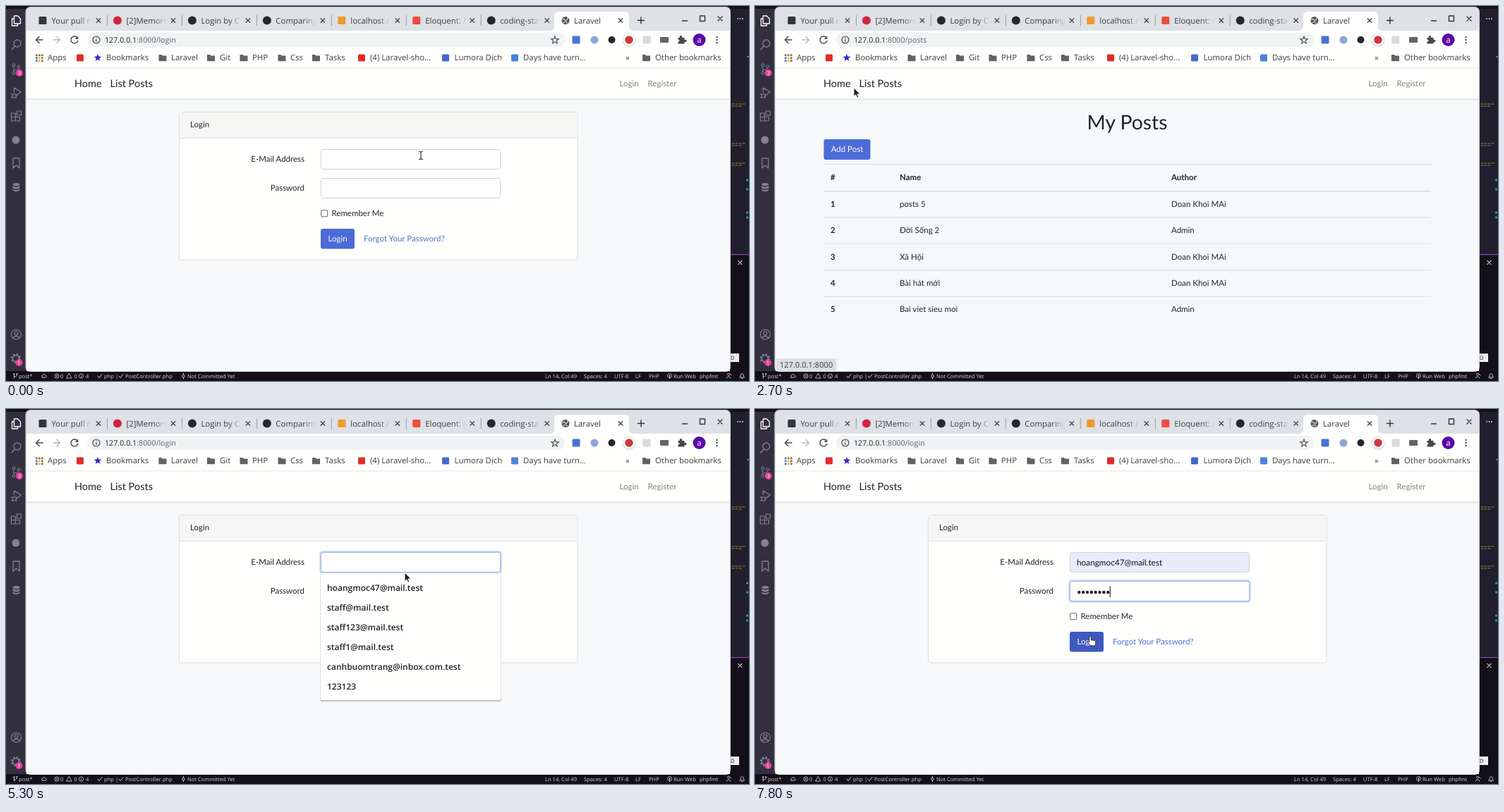
Animation, 1053 px wide and 532 px high, one loop 8000 ms. Source, as an HTML page:

```html
<!DOCTYPE html>
<html lang="en">
<head>
<meta charset="utf-8">
<title>Login demo</title>
<style>
html, body { margin: 0; width: 100%; height: 100%; overflow: hidden; background: #131019; }
svg { display: block; width: 100vw; height: 100vh; }
text { text-rendering: geometricPrecision; white-space: pre; fill: #212529; }
.ui { font: 11.4px "Open Sans", "Noto Sans", sans-serif; fill: #3b3d40; }
.url { font: 10.7px "Open Sans", "Noto Sans", sans-serif; fill: #202124; }
.bar { font: 7.6px "Open Sans", "Noto Sans", sans-serif; fill: #d8d6de; }
.hint { font: 600 12px "Open Sans", "Noto Sans", sans-serif; }
.page { font: 11.5px Lato, "Open Sans", sans-serif; }
.b { font-weight: 700; }
.nav { font: 14.5px Lato, "Open Sans", sans-serif; }
.mail { font: 11.8px Lato, "Open Sans", sans-serif; fill: #111; }
.h1 { font: 28.3px Lato, "Open Sans", sans-serif; }
.muted { fill: #838383; }
.link { fill: #4f74cf; }
.white { fill: #fff; }
.line { fill: none; stroke-linecap: round; stroke-linejoin: round; }
</style>
</head>
<body>
<svg id="stage" viewBox="0 0 1053 532" preserveAspectRatio="none"></svg>
<script>
const LOOP = 8000, STEP = 100;
const WHITE = '#fefefc', MAIL = 'hoangmoc47@mail.test';
const BLUE = '#4b6bd6', BLUE_HOVER = '#3f59bf';

const text = (x, y, s, cls, more = '') => `<text x="${x}" y="${y}" class="${cls}" ${more}>${s}</text>`;
const rect = (x, y, w, h, fill, more = '') => `<rect x="${x}" y="${y}" width="${w}" height="${h}" fill="${fill}" ${more}/>`;
const disc = (x, y, r, fill, more = '') => `<circle cx="${x}" cy="${y}" r="${r}" fill="${fill}" ${more}/>`;
const line = (d, color, w = 1.3, more = '') => `<path class="line" d="${d}" stroke="${color}" stroke-width="${w}" ${more}/>`;
const shape = (d, fill, more = '') => `<path d="${d}" fill="${fill}" ${more}/>`;
const group = (id, body, more = '') => `<g id="${id}" ${more}>${body}</g>`;
const at = (x, y, body) => `<g transform="translate(${x} ${y})">${body}</g>`;
const square = (x, y, fill, s = 10) => rect(x - s / 2, y - s / 2, s, s, fill, 'rx="1.5"');
const cross = (x, y, r, color, w = 1.3) => line(`M${x - r} ${y - r}l${2 * r} ${2 * r}m0 ${-2 * r}l${-2 * r} ${2 * r}`, color, w);
const folder = x => shape(`M${x - 5.5} 69h4l1.5 1.6h5.5v7.6h-11z`, '#5f6368');

function star(x, y, r) {
  let d = '';
  for (let i = 0; i < 10; i++) {
    const a = -Math.PI / 2 + i * Math.PI / 5, k = i % 2 ? r * .42 : r;
    d += (i ? 'L' : 'M') + (x + k * Math.cos(a)).toFixed(2) + ' ' + (y + k * Math.sin(a)).toFixed(2);
  }
  return d + 'Z';
}

function editor() {
  const g = '#85828f';
  const badge = (x, y, s) => disc(x, y, 5, '#e3419b') + text(x, y + 2.7, s, 'bar white', 'text-anchor="middle"');
  let s = rect(0, 0, 1053, 532, '#131019') + rect(0, 4, 29, 514, '#322f3e') +
    rect(1026, 4, 27, 348, '#211e2d') + rect(1026, 352, 27, 1.2, '#8b45b8');
  s += at(14.5, 21, line('M-3-7h5l4 4v7h-9zM-3-3h-3v10h8v-3', '#fff'));
  s += at(14.5, 55, disc(1.5, -2, 5, 'none', `stroke="${g}" stroke-width="1.3"`) + line('M-2 2l-4.5 5', g));
  s += at(14, 89, [[-3, -5], [4, -3], [-3, 6]].map(p => disc(...p, 2, 'none', `stroke="${g}"`)).join('') + line('M-3-3v7M4-1q0 3-7 3', g, 1)) + badge(19, 95, 3);
  s += at(14.5, 123, line('M-3-1v-6l10 6-8 6M-5 2h5v5h-5zM-7 2l2 1m-2 4l2-1', g, 1.2));
  s += at(14.5, 156, line('M-7-4h6v11h-6zM-7 1.500h12v5.500h-6M1-7h6v6h-6z', g, 1.2));
  s += disc(14, 190, 5.5, g);
  s += at(14.5, 223, line('M-4.500-7h9v14l-4.500-4-4.500 4z', g));
  s += at(14.5, 257, `<ellipse cy="-4" rx="5" ry="2" fill="${g}"/>` + shape('M-5-2q5 3 10 0v3q-5 3-10 0zM-5 2.500q5 3 10 0v2q-5 3-10 0z', g));
  s += at(14.5, 466, disc(0, 0, 7, 'none', `stroke="${g}" stroke-width="1.2"`) + disc(0, -2, 2.5, 'none', `stroke="${g}" stroke-width="1.2"`) + line('M-4.500 5q4.500-6 9 0', g));
  s += disc(14, 500, 5.5, 'none', `stroke="${g}" stroke-width="3" stroke-dasharray="2.300 2.020"`) +
    disc(14, 500, 4.4, 'none', `stroke="${g}" stroke-width="1.400"`) + badge(18.5, 506, 1);

  [1037, 1040.5, 1044].forEach(x => s += disc(x, 18, .9, '#ddd'));
  [139, 142, 195, 198, 223, 226].forEach((y, i) => s += line(`M1029 ${y}h${i % 2 ? 13 : 18}`, '#8b8c45', 1, 'stroke-dasharray="3 2"'));
  [247, 260, 293, 300].forEach(y => s += rect(1049, y - 1.5, 3, 3, '#1fa77a'));
  s += rect(1050, 71, 3, 2, '#3d77b8') + cross(1040.5, 364, 2.6, '#ddd', 1.1);
  s += rect(1026, 493, 13, 12, '#eee') + text(1027, 502, 'D', 'bar', 'style="fill:#222"');

  const w = '#d8d6de';
  s += line('M11.500 523v5m0-2q4 0 4-2.500', w, .9) + disc(11.5, 522, 1.1, w) + disc(15.5, 522, 1.1, w);
  s += line('M51.500 527h5q2-1 0-3-2-3-4-.5-3 .5-1 3.500z', w, .9);
  s += disc(72, 525, 3.1, 'none', `stroke="${w}" stroke-width=".8"`) + cross(72, 525, 1.3, w, .7);
  s += line('M89.500 521.500l3.500 6.500h-7z', w, .8) + disc(106.5, 525, 3.1, 'none', `stroke="${w}" stroke-width=".8"`) + line('M106.500 524.500v2', w, .8);
  [130, 160].forEach(x => s += line(`M${x} 525l2 2.500 4-5`, w, 1));
  s += disc(251.5, 525, 1.8, 'none', `stroke="${w}" stroke-width=".9"`) + line('M251.500 521v2m0 4v2', w, .9);
  [[18, 'post*'], [77, '0'], [96.5, '0'], [113, '4'], [139, 'php |'], [169, 'PostController.php'], [257, 'Not Committed Yet'],
    [764, 'Ln 14, Col 49'], [819, 'Spaces: 4'], [862, 'UTF-8'], [892, 'LF'], [911, 'PHP'], [946, 'Run Web'], [983, 'phpfmt']]
    .forEach(([x, t]) => s += text(x, 527.5, t, 'bar'));
  s += disc(940.5, 524.5, 3, 'none', `stroke="${w}" stroke-width=".8"`) + disc(940.5, 524.5, 1.1, w) + line('M940.500 525v3.500', w, .8);
  s += line('M1021 528q3-5 6 0M1026 522l2 2', w, .9) + disc(1024, 522.5, 1.5, 'none', `stroke="${w}" stroke-width=".8"`);
  return s + line('M1040 527h6.500l-1-1.500v-2q-2.200-4-4.500 0v2zm2.500 1.500h1.500', w, .9);
}

function tabs() {
  const names = ['Your pull r', '[2]Memoro', 'Login by C', 'Comparing', 'localhost /', 'Eloquent: A', 'coding-sta'];
  const marks = ['#33363b', '#d0243f', '#24292e', '#24292e', '#ee9a2f', '#ef4b3f', '#24292e'];
  const round = [0, 1, 1, 1, 0, 0, 1];
  let s = rect(29, 2, 997, 60, '#dee1e5', 'rx="6"');
  s += shape('M770 35q7 0 7-6V14q0-6 6-6h94q6 0 6 6v15q0 6 7 6z', WHITE);
  names.forEach((n, i) => {
    const x = 52 + i * 105.95;
    s += round[i] ? disc(x, 20.5, 6, marks[i]) : square(x, 20.5, marks[i], 11);
    s += `<svg x="${x + 12}" y="8" width="57" height="26">${text(.5, 16.6, n, 'ui')}</svg>`;
    s += rect(x + 52, 10, 17, 22, 'url(#fade)') + cross(x + 79, 20.5, 2.8, '#45484c');
    if (i < 6) s += rect(x + 91, 13, 1, 15, '#9a9da2');
  });
  s += group('globe', disc(793, 20.5, 5.5, '#55585c') + line('M788.500 19q3-1 4 1t3-1 0-3M790 24q2-3 5 0', '#dfe2e5', 1.2));
  s += group('spin', line('M0-5.500q1.500 0 2.600.7', '#a5ad62', 1.3));
  s += `<svg x="805" y="8" width="54" height="26"><text id="title" x="0" y="16.6" class="ui"></text></svg>`;
  s += rect(847, 12, 13, 18, 'url(#fadeWhite)') + cross(871, 20.5, 2.8, '#45484c');
  s += line('M895.500 20.500h9m-4.500-4.500v9M958.500 21h7M983.500 14h7v7.500h-7z', '#333', 1.4) + cross(1012, 18, 3, '#333', 1.4);
  return s;
}

function toolbar() {
  const k = '#45484c';
  let s = rect(29, 35, 997, 53, WHITE) + rect(115, 38, 677, 20, '#f0f2f3', 'rx="10"');
  s += line('M52 48H42.500m4.500-4.500l-4.500 4.500 4.500 4.500', k, 1.5) + line('M67 48h9.500m-4.500-4.500l4.500 4.500-4.500 4.500', '#b9bbbe', 1.5);
  s += group('reload', line('M101 45a5 5 0 1 0 .800 4.500', k, 1.5) + shape('M102.300 42.500v4.500h-4.500z', k));
  s += group('stop', cross(97, 48, 4, k, 1.5));
  s += disc(128, 48, 5, 'none', `stroke="${k}" stroke-width="1.2"`) + line('M128 47.500v3', k, 1.2) + disc(128, 45.3, .8, k);
  s += `<text x="140" y="52" class="url">127.0.0.1<tspan id="path" fill="#63676b"></tspan></text>`;
  s += shape(star(778, 48.5, 5.5), 'none', `stroke="${k}" stroke-width="1.1"`);
  s += square(808, 48, '#4774d6', 11) + disc(834, 48, 5.5, '#8da6d4') + disc(858.5, 48, 5, '#25272a');
  s += group('ring', disc(883, 48.4, 9.4, '#d0d2d4') + disc(883, 48, 8.6, '#fff'));
  s += disc(883, 48, 5.8, '#cf3a40') + square(908, 48, '#d9dadb', 11) + rect(927, 44, 12, 8, '#606367', 'rx="1"');
  s += shape('M952.500 45h2.500q-1-3 1.500-3t1.500 3h3.500v3q3-1 3 1.500t-3 1.500v2.500h-9v-3q2 0 2-1.500t-2-1.500z', k);
  s += disc(982.5, 48, 9, '#5a0aa5') + text(982.5, 51.7, 'a', 'ui white', 'text-anchor="middle"');
  [44, 48, 52].forEach(y => s += disc(1007.5, y, 1.2, k));

  const hues = ['#e0473b', '#3c9a55', '#e0473b', '#3b78d8', '#f0b32c', '#3c9a55', '#3b78d8', '#f0b32c', '#e0473b'];
  hues.forEach((c, i) => s += rect(42 + i % 3 * 4, 68.5 + (i / 3 | 0) * 4, 2.7, 2.7, c));
  s += square(105, 73.5, '#e12b2b') + shape(star(130, 73.5, 5.6), '#3a22d0') + square(504, 73.5, '#e12b2b');
  s += square(623, 73.5, '#4468cf') + square(721, 73.5, '#4a83d8');
  [222, 290.5, 337, 391, 439.5, 907.5].forEach(x => s += folder(x));
  [[59, 'Apps'], [142, 'Bookmarks'], [234, 'Laravel'], [303, 'Git'], [349, 'PHP'], [403, 'Css'], [452, 'Tasks'],
    [516, '(4) Laravel-sho...'], [635.5, 'Lumora Dịch'], [733, 'Days have turn...'], [878, '»'], [920, 'Other bookmarks']]
    .forEach(([x, t]) => s += text(x, 77.4, t, 'ui'));
  return s + rect(29, 87.5, 997, 1, '#dfe1e3');
}

function navbar() {
  return rect(29, 131, 997, 4, 'url(#shade)') + rect(29, 88.5, 997, 42.5, WHITE) +
    text(97, 115, 'Home', 'nav') + text(147.5, 115, 'List Posts', 'nav') +
    text(869.5, 113.6, 'Login', 'page muted', 'id="navLogin"') + text(909.5, 113.6, 'Register', 'page muted');
}

function field(id, y) {
  return rect(444.3, y - 1.7, 258.4, 32.4, '#c4d6f3', `rx="4.5" id="${id}Ring"`) +
    rect(446.5, y + .5, 254, 28, WHITE, `rx="3" stroke="#ced2d6" id="${id}Box"`);
}

function loginPage() {
  const hints = [MAIL, 'staff@mail.test', 'staff123@mail.test', 'staff1@mail.test', 'canhbuomtrang@inbox.com.test', '123123'];
  let s = rect(245.5, 150.5, 564.5, 209.5, WHITE, 'rx="3" stroke="#dcdedf"');
  s += rect(246, 151, 563.5, 36, '#f6f6f4') + rect(246, 187, 563.5, 1, '#dcdedf');
  s += text(261, 172.4, 'Login', 'page') + text(423, 221.2, 'E-Mail Address', 'page', 'text-anchor="end"') +
    text(423, 262.2, 'Password', 'page', 'text-anchor="end"');
  s += field('mail', 203) + field('pass', 244);
  s += text(456, 222, MAIL, 'mail', 'id="mailText"') + line('', '#e04a4a', .8, 'id="squiggle"');
  s += group('dots', '') + rect(0, 0, 1, 16, '#111', 'id="caret"');
  s += rect(446.7, 289.7, 9, 9, WHITE, 'rx="1.5" stroke="#6d6d6d" stroke-width="1.1"') + text(461.5, 298, 'Remember Me', 'page');
  s += rect(446, 316, 48, 28.5, BLUE, 'rx="3" id="submit"') + text(470, 333.8, 'Login', 'page white', 'text-anchor="middle"');
  s += text(507, 333.8, 'Forgot Your Password?', 'page link');
  s += group('hints', rect(445, 234, 257, 181, '#bfc1c3', 'rx="3"') + rect(445.5, 233, 256, 180, WHITE, 'rx="2"') +
    rect(445.5, 240, 256, 28, '#e8e9ea', 'id="hintRow"') +
    hints.map((h, i) => text(455, 258.2 + i * 27.9, h, 'hint')).join(''));
  return s;
}

function postsPage() {
  const rows = [['#', 'Name', 'Author'], [1, 'posts 5', 0], [2, 'Đời Sống 2', 1], [3, 'Xã Hội', 0], [4, 'Bài hát mới', 0], [5, 'Bai viet sieu moi', 1]];
  const who = ['Doan Khoi MAi', 'Admin'];
  let s = text(527.5, 175, 'My Posts', 'h1', 'text-anchor="middle"');
  s += rect(97.5, 189, 66, 29, BLUE, 'rx="3"') + text(130.5, 207.3, 'Add Post', 'page white', 'text-anchor="middle"');
  rows.forEach(([n, name, by], i) => {
    const y = i ? 247.7 + i * 37.3 : 247;
    s += text(107, y, n, 'page b') + text(205, y, name, i ? 'page' : 'page b') + text(590, y, i ? who[by] : by, i ? 'page' : 'page b');
    s += rect(97, i ? 224.600 + i * 37.4 : 224, 861, i === 1 ? 1.5 : 1, '#dadde0');
  });
  return s;
}

const arrow = shape('M0 0V12.500L2.900 9.800 4.900 14.200 6.900 13.300 5 9H8.800Z', '#222', 'stroke="#fff" stroke-width=".9"');
const beam = line('M-2.500-5.500q2.500 0 2.500 1.500v8q0 1.500-2.500 1.500M2.500-5.500q-2.500 0-2.500 1.500v8q0 1.500 2.500 1.500', '#222', 1.1);
const hand = shape('M-1.300 1q1.300-2 2.600 0V5.500l5 1q2 .5 1.700 2.500l-1 5h-6.500l-4-5q-.5-1.800 1-1.200l1.200 1.200z', '#fff', 'stroke="#222" stroke-width="1" stroke-linejoin="round"');

document.getElementById('stage').innerHTML = `<defs>
  <linearGradient id="fade"><stop stop-color="#dee1e5" stop-opacity="0"/><stop offset="1" stop-color="#dee1e5"/></linearGradient>
  <linearGradient id="fadeWhite"><stop stop-color="${WHITE}" stop-opacity="0"/><stop offset="1" stop-color="${WHITE}"/></linearGradient>
  <linearGradient id="shade" x2="0" y2="1"><stop stop-color="#e2e5e8"/><stop offset="1" stop-color="#f6f8fa"/></linearGradient></defs>` +
  editor() + rect(27.5, 1, 999.5, 518, '#c9cbcf', 'rx="7"') + tabs() + rect(29, 60, 997, 458, '#f6f8fa') + toolbar() + navbar() +
  group('login', loginPage()) + group('posts', postsPage()) +
  group('bubble', shape('', '#dcdfe2', 'id="bubbleBox"') + text(35, 512.7, '', 'ui', 'id="bubbleText" style="font-size:11.100px"')) +
  group('cursor', group('arrow', arrow) + group('beam', beam) + group('hand', hand));

const el = {};
document.querySelectorAll('[id]').forEach(e => el[e.id] = e);
const show = (id, on) => el[id].style.display = on ? '' : 'none';
const set = (id, o) => Object.entries(o).forEach(([k, v]) => el[id].setAttribute(k, v));
const put = (id, s) => { if (el[id].textContent !== s) el[id].textContent = s; };

// time, x, y of the pointer; its kind lasts until another is named
const moves = [
  [0, 588, 212, 'beam'], [100, 588, 212], [200, 450, 204, 'arrow'], [300, 316, 192], [400, 316, 192],
  [600, 205, 128], [700, 184, 112, 'hand'], [1100, 184, 112], [1200, 230, 135, 'arrow'], [1400, 439, 205],
  [1700, 676, 270], [1900, 520, 235], [2200, 168, 163], [2300, 168, 112, 'hand'], [2500, 128, 111],
  [2700, 140, 116, 'arrow'], [2900, 142, 118], [3200, 142, 118], [4100, 858, 120], [4200, 872, 116, 'hand'],
  [4400, 872, 116], [4500, 840, 160, 'arrow'], [4600, 808, 200], [4700, 808, 200], [4900, 640, 213, 'beam'],
  [5000, 465, 214], [5100, 560, 216], [5200, 560, 216], [5300, 565, 232, 'arrow'], [5500, 548, 249],
  [5700, 540, 258, 'beam'], [5800, 533, 262], [7200, 531, 262], [7500, 504, 274, 'arrow'], [7600, 490, 303],
  [7700, 478, 320, 'hand'], [7800, 475, 322]
];

function pointer(t) {
  let i = 0, kind = 'beam';
  while (i < moves.length && moves[i][0] <= t) kind = moves[i++][3] || kind;
  const a = moves[i - 1], b = moves[i] || a;
  const k = b === a ? 0 : (t - a[0]) / (b[0] - a[0]);
  return { x: a[1] + (b[1] - a[1]) * k, y: a[2] + (b[2] - a[2]) * k, kind };
}

// start, path, opacity of the address bubble
const bubbles = [[0, '', 0], [700, '/posts', 1], [1300, '/posts', .75], [1400, '/posts', .5], [1500, '/posts', .25], [1600, '', 0],
  [2300, '/posts', 1], [2500, '', 1], [2800, '', .6], [2900, '', .3], [3300, '', 0], [4400, '/login', .65], [4500, '/login', .35], [4600, '', 0]];
const within = (t, a, b) => t >= a && t < b;

function draw(ms) {
  const t = Math.floor(ms / STEP) * STEP;
  const posts = within(t, 1200, 4500);
  const loading = within(t, 900, 1200) || within(t, 4400, 4600);
  show('posts', posts);
  show('login', !posts);
  ['spin', 'stop'].forEach(id => show(id, loading));
  ['globe', 'reload', 'ring'].forEach(id => show(id, !loading));
  set('spin', { transform: `translate(793 20.5) rotate(${(t - 4400) * .9})` });
  put('title', loading ? '127.0.0.1:8000' : 'Laravel');
  put('path', ':8000' + (within(t, 900, 4400) ? '/posts' : '/login'));
  el.navLogin.style.fill = within(t, 4200, 4500) ? '#636363' : '';

  const [, path, alpha] = bubbles.filter(b => b[0] <= t).pop();
  set('bubble', { opacity: alpha });
  put('bubbleText', '127.0.0.1:8000' + path);
  const w = el.bubbleText.getComputedTextLength() + 7;
  set('bubbleBox', { d: `M30 500h${w}q3 0 3 3v14.500H30z` });

  const mailFocus = within(t, 5300, 6000), passFocus = t >= 6000, filled = t >= 5500;
  [['mail', mailFocus], ['pass', passFocus]].forEach(([id, on]) => {
    show(id + 'Ring', on);
    set(id + 'Box', { stroke: on ? '#9db9e8' : '#ced2d6' });
  });
  set('mailBox', { fill: filled ? '#e8ebfa' : WHITE });
  show('mailText', filled);
  show('hints', within(t, 5300, 5600));
  show('hintRow', within(t, 5400, 5600));
  show('squiggle', within(t, 5600, 6000));
  if (filled && !posts) {
    const n = Math.round(el.mailText.getSubStringLength(0, 10) / 4);
    set('squiggle', { d: 'M456 224.500' + 'q1-1.500 2 0t2 0'.repeat(n) });
  }

  const count = t < 6000 ? 0 : t < 6400 ? Math.min(2, (t - 6000) / 100 + 1) : t < 6700 ? Math.min(4, 3 + (t - 6400) / 100) : Math.min(8, 5 + Math.floor((t - 6700) / 100));
  el.dots.innerHTML = Array.from({ length: count }, (_, i) => disc(459.3 + i * 5.85, 260, 2.2, '#222')).join('');
  show('caret', within(t, 5600, 6000) || passFocus);
  set('caret', passFocus ? { x: 456 + count * 5.85, y: 251 } : { x: 456.5 + (filled ? el.mailText.getComputedTextLength() : 0), y: 210 });
  set('submit', { fill: t >= 7700 ? BLUE_HOVER : BLUE });

  const p = pointer(t);
  set('cursor', { transform: `translate(${p.x} ${p.y})` });
  ['arrow', 'beam', 'hand'].forEach(id => show(id, p.kind === id && !within(t, 6400, 7200)));
}

const start = performance.now();
function tick() {
  draw((performance.now() - start) % LOOP);
  requestAnimationFrame(tick);
}
tick();
</script>
</body>
</html>
```
